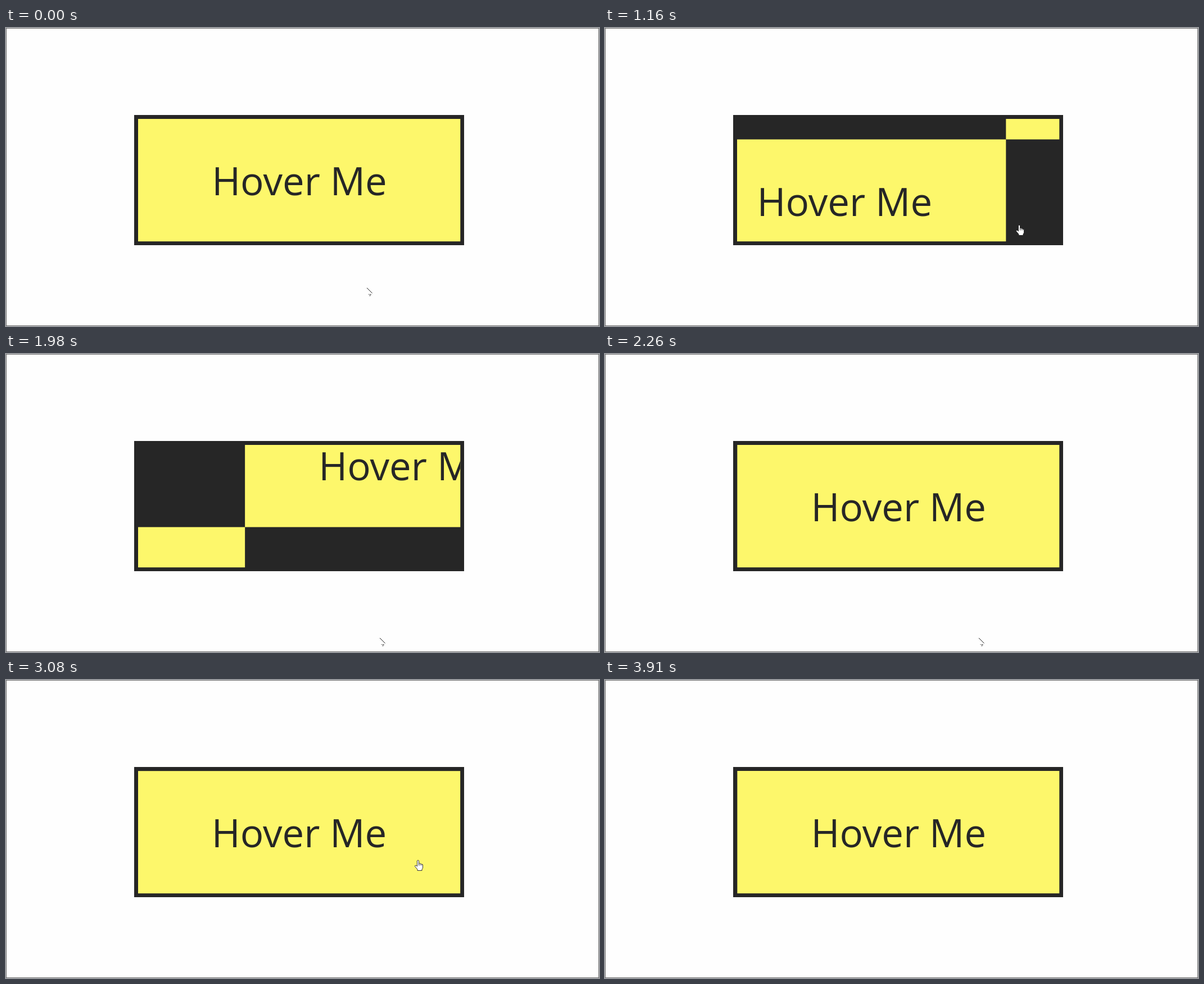
An HTML page that plays this animation: 1055 px wide and 531 px high, repeating every 4370 ms.

```html
<!DOCTYPE html>
<html lang="en">
<head>
<meta charset="utf-8">
<title>Hover button</title>
<style>
  html, body { margin: 0; height: 100%; overflow: hidden; background: #fefefe; }
  svg { display: block; }
  text { font: 69px "Open Sans", "Noto Sans", sans-serif; fill: #262626; }
</style>
</head>
<body>
<svg width="1055" height="531" viewBox="0 0 1055 531">
  <defs>
    <clipPath id="inside"><rect x="235" y="162" width="573.3" height="218.3"/></clipPath>
    <g id="face">
      <rect x="235" y="162" width="574" height="219" fill="#fdf76b"/>
      <text x="366.2" y="298">Hover Me</text>
    </g>
  </defs>
  <rect x=".5" y=".5" width="1054" height="530" fill="#fefefe" stroke="#6a6a6a"/>
  <rect x="228" y="155" width="587" height="232" fill="#262626"/>
  <g clip-path="url(#inside)">
    <use id="leaving" href="#face"/>
    <use id="arriving" href="#face"/>
  </g>
  <g id="arrow" fill="none" stroke="#222">
    <path d="M0 0L9.5 9.5"/>
    <path d="M2.5 11.5h1.5M5 15V11.5h2.5L6 14.5" stroke-width=".8" stroke="#555"/>
  </g>
  <g id="hand" fill="#fff" stroke="#222" stroke-width=".9">
    <path d="M-1.5 11V1Q0 -1 1.5 1V6Q3 4.5 4 6.5Q5.5 5.5 6.5 7.5Q8.5 6.5 8.5 9V13Q8.5 15 7 16V18.5H-1V16.5L-5.5 11Q-5.5 8.5 -3.5 9.5Z"/>
    <path d="M1.5 6V9.5M4 6.5V9.5M6.5 7.5V9.5" fill="none"/>
  </g>
</svg>
<script>
const LOOP = 4370, SLIDE = 484, WIDTH = 574, HEIGHT = 219, EDGE = 387;
const el = id => document.getElementById(id);
const move = (node, x, y) => node.setAttribute("transform", `translate(${x} ${y})`);
const clamp = u => Math.min(1, Math.max(0, u));
const smooth = u => u * u * (3 - 2 * u);
const bezier = (a, b, s) => 3 * a * s * (1 - s) ** 2 + 3 * b * s * s * (1 - s) + s ** 3;

// CSS "ease": cubic-bezier(.25, .1, .25, 1), solved by bisection
function ease(x) {
  let s = .5;
  for (let step = .25; step > 1e-6; step /= 2) s += bezier(.25, .25, s) < x ? step : -step;
  return bezier(.1, 1, s);
}

// The pointer glides in and out of the button in turn; each crossing starts a slide
const home = { x: 642, y: 463 };
const glides = [
  { start: 365, time: 855, x: 739, y: 349, cross: 903 },
  { start: 1710, time: 270, x: 665, y: 506, cross: 1792 },
  { start: 2450, time: 274, x: 733, y: 321, cross: 2615 },
  { start: 3310, time: 448, x: 660, y: 620, cross: 3443 }
];

function pointerAt(t) {
  let { x, y } = home;
  for (const g of glides) {
    const k = smooth(clamp((t - g.start) / g.time));
    x += (g.x - x) * k ** 1.3;
    y += (g.y - y) * k;
  }
  return [Math.round(x), Math.round(y)];
}

// Entering adds a full slide, leaving takes it back
const slideAt = t => glides.reduce((sum, g, i) => {
  const u = clamp((t - g.cross) / SLIDE);
  return sum + (i % 2 ? -1 : 1) * (u < 1 ? u && ease(u) : 1);
}, 0);

function draw(now) {
  const t = now % LOOP, p = slideAt(t), [x, y] = pointerAt(t);
  move(el("leaving"), WIDTH * p, -HEIGHT * p);
  move(el("arriving"), WIDTH * (p - 1), HEIGHT * (1 - p));
  const hovering = y < EDGE;
  el("hand").style.display = hovering ? "" : "none";
  el("arrow").style.display = hovering ? "none" : "";
  move(el(hovering ? "hand" : "arrow"), x, y);
}

const begin = performance.now();
(function tick() {
  draw(performance.now() - begin);
  requestAnimationFrame(tick);
})();
</script>
</body>
</html>
```
